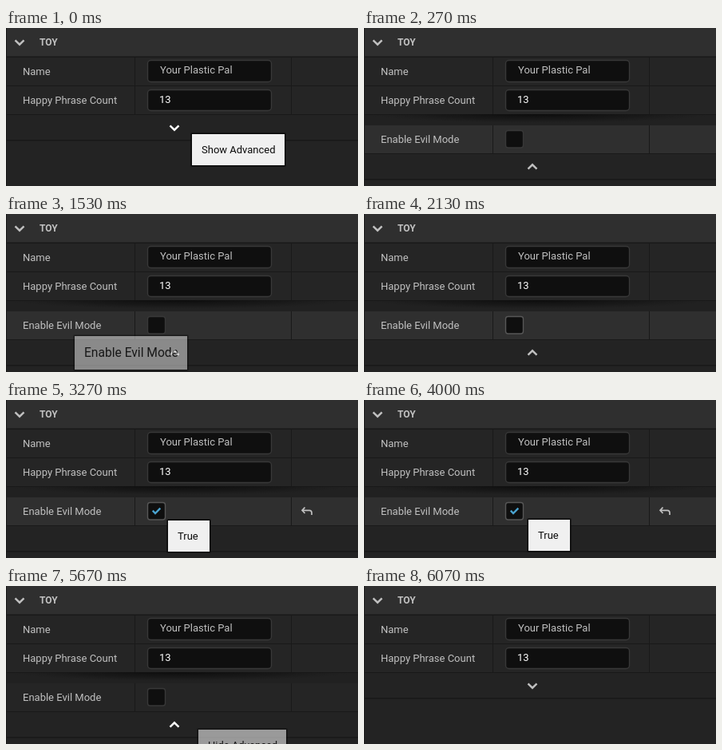
Recreate the animation shown at these times as an HTML page. Size 441 by 198 pixels, loop 7.39 s.

```html
<!DOCTYPE html>
<html lang="en">
<head>
<meta charset="utf-8">
<title>Details panel</title>
<style>
  html, body { margin: 0; width: 100%; height: 100%; overflow: hidden; background: #232323; }
  svg { display: block; width: 441px; height: 198px; font: 13px Roboto, sans-serif; fill: #c0c0c0; }
  .icon { fill: none; stroke: #c0c0c0; stroke-width: 2.4; }
  .line { fill: #191919; }
  .row { fill: #252525; }
  .field { fill: #0f0f0f; stroke: #383838; stroke-width: 1.4; }
</style>
</head>
<body>
<svg viewBox="0 0 441 198">
  <defs>
    <radialGradient id="shade">
      <stop offset="0" stop-color="#0c0c0c"/>
      <stop offset=".6" stop-color="#151515" stop-opacity=".7"/>
      <stop offset="1" stop-color="#1a1a1a" stop-opacity="0"/>
    </radialGradient>
    <path id="chevron" d="M-5.5 -2.7 L0 2.7 L5.5 -2.7"/>
  </defs>

  <rect width="441" height="198" fill="#232323"/>
  <rect width="441" height="36" fill="#2f2f2f"/>
  <rect class="row" y="37" width="441" height="71"/>
  <path class="line" d="M0 35.5h441v1.5H0z M0 72h441v1H0z M0 108h441v1H0z M161 37h1v71h-1z M357 37h1v71h-1z"/>
  <use href="#chevron" class="icon" x="17" y="18"/>
  <text x="42" y="22" font-size="12" font-weight="700">TOY</text>
  <text x="21" y="59">Name</text>
  <text x="21" y="95">Happy Phrase Count</text>
  <rect class="field" x="177.5" y="40.5" width="155" height="27" rx="4"/>
  <rect class="field" x="177.5" y="77.5" width="155" height="26" rx="4"/>
  <text x="193" y="57">Your Plastic Pal</text>
  <text x="192" y="94" fill="#fff">13</text>

  <g id="collapsed">
    <path class="line" d="M0 140h441v1.5H0z"/>
  </g>

  <g id="expanded">
    <rect y="109" width="441" height="13" fill="#212121"/>
    <svg y="108" width="441" height="14" viewBox="0 108 441 14">
      <ellipse cx="220" cy="108" rx="216" ry="11" fill="url(#shade)"/>
    </svg>
    <rect id="row" y="122" width="441" height="35"/>
    <path class="line" d="M0 157h441v1H0z M0 189h441v1.5H0z M161 122h1v35h-1z M357 122h1v35h-1z"/>
    <text x="21" y="144">Enable Evil Mode</text>
    <rect id="box" class="field" x="177.5" y="128.5" width="22" height="21.5" rx="3"/>
    <g id="checked" fill="none">
      <path d="M183.8 138.7 L187 142 L193.3 135.7" stroke="#4aa3cf" stroke-width="2.4"/>
      <path d="M374.5 134.5 L371 138.3 L374.5 142 M371.5 138.3 H380 a3 3 0 0 1 3 3 V144" stroke="#c0c0c0" stroke-width="1.7"/>
    </g>
  </g>

  <use id="arrow" href="#chevron" class="icon"/>

  <g id="tip">
    <rect id="tipShadow" x="-2" y="-2" rx="2" fill="#000" fill-opacity=".45"/>
    <rect id="tipEdge" x="-1" y="-1" fill="#0c0c0c"/>
    <rect id="tipFace" fill="#f0f0f0"/>
    <text id="tipText" x="12" fill="#0c0c0c"></text>
  </g>
  <rect class="line" width="1" height="198"/>
</svg>
<script>
const LOOP = 7390;
const el = id => document.getElementById(id);

const labels = {
  show: { text: 'Show Advanced', width: 116, height: 39, size: 13 },
  hide: { text: 'Hide Advanced', width: 110, height: 39, size: 13 },
  mode: { text: 'Enable Evil Mode', width: 141, height: 42, size: 15.6 },
  on: { text: 'True', width: 52, height: 39, size: 13 },
  off: { text: 'False', width: 57, height: 39, size: 13 }
};
const tip = (label, x, y, alpha = 1) => ({ tip: { ...labels[label], x, y, alpha } });
const noTip = { tip: null };

// Each step changes only the listed parts of the state; hover is arrow, row, box or none.
const steps = [
  [0, { open: false, checked: false, hover: 'arrow', ...tip('show', 233, 133) }],
  [70, tip('show', 229, 133)],
  [130, tip('show', 227, 133)],
  [270, { open: true, hover: 'row', ...noTip }],
  [1130, tip('mode', 89, 153, .57)],
  [1200, tip('mode', 86, 153)],
  [1530, tip('mode', 86, 153, .5)],
  [1600, noTip],
  [1800, { hover: 'arrow', ...tip('hide', 221, 180, .3) }],
  [1870, { hover: 'row', ...noTip }],
  [2130, { hover: 'box' }],
  [2330, tip('off', 202, 151, .3)],
  [2400, tip('off', 202, 151, .65)],
  [2530, tip('off', 202, 151)],
  [3270, { checked: true, ...tip('on', 203, 151) }],
  [3470, tip('on', 203, 150)],
  [4000, tip('on', 206, 150)],
  [4070, { hover: 'row', ...tip('on', 206, 150, .5) }],
  [4130, noTip],
  [4530, { hover: 'box' }],
  [4730, tip('on', 215, 150, .28)],
  [4800, tip('on', 206, 149, .7)],
  [4930, { checked: false, ...tip('off', 202, 149) }],
  [5330, tip('off', 203, 151)],
  [5400, { hover: 'row', ...tip('off', 203, 151, .5) }],
  [5470, { hover: 'arrow', ...noTip }],
  [5670, tip('hide', 241, 180, .58)],
  [5730, tip('hide', 237, 180, .75)],
  [5800, tip('hide', 235, 180, .9)],
  [5870, tip('hide', 233, 180)],
  [6070, { open: false, hover: 'none', ...noTip }]
];

const set = (id, attrs) => {
  for (const name in attrs) el(id).setAttribute(name, attrs[name]);
};
const show = (id, on) => set(id, { visibility: on ? 'visible' : 'hidden' });

function drawTip(t) {
  show('tip', t);
  if (!t) return;
  set('tip', { transform: `translate(${t.x} ${t.y})`, opacity: t.alpha });
  ['tipFace', 'tipEdge', 'tipShadow'].forEach((id, grow) =>
    set(id, { width: t.width + 2 * grow, height: t.height + 2 * grow }));
  set('tipText', { y: t.height / 2 + 4.7, 'font-size': t.size });
  el('tipText').textContent = t.text;
}

function draw(time) {
  const state = Object.assign({}, ...steps.filter(([at]) => at <= time).map(([, change]) => change));
  const { open, checked, hover } = state;
  show('collapsed', !open);
  show('expanded', open);
  show('checked', open && checked);
  set('row', { fill: hover === 'row' || hover === 'box' ? '#2f2f2f' : '#252525' });
  el('box').style.stroke = hover === 'box' ? '#575757' : '#383838';
  set('arrow', { transform: `translate(211 ${open ? 174 : 125}) scale(1 ${open ? -1 : 1})` });
  el('arrow').style.stroke = hover === 'arrow' ? '#fff' : '#c0c0c0';
  drawTip(state.tip);
}

const start = performance.now();
function tick() {
  draw((performance.now() - start) % LOOP);
  requestAnimationFrame(tick);
}
tick();
</script>
</body>
</html>
```
